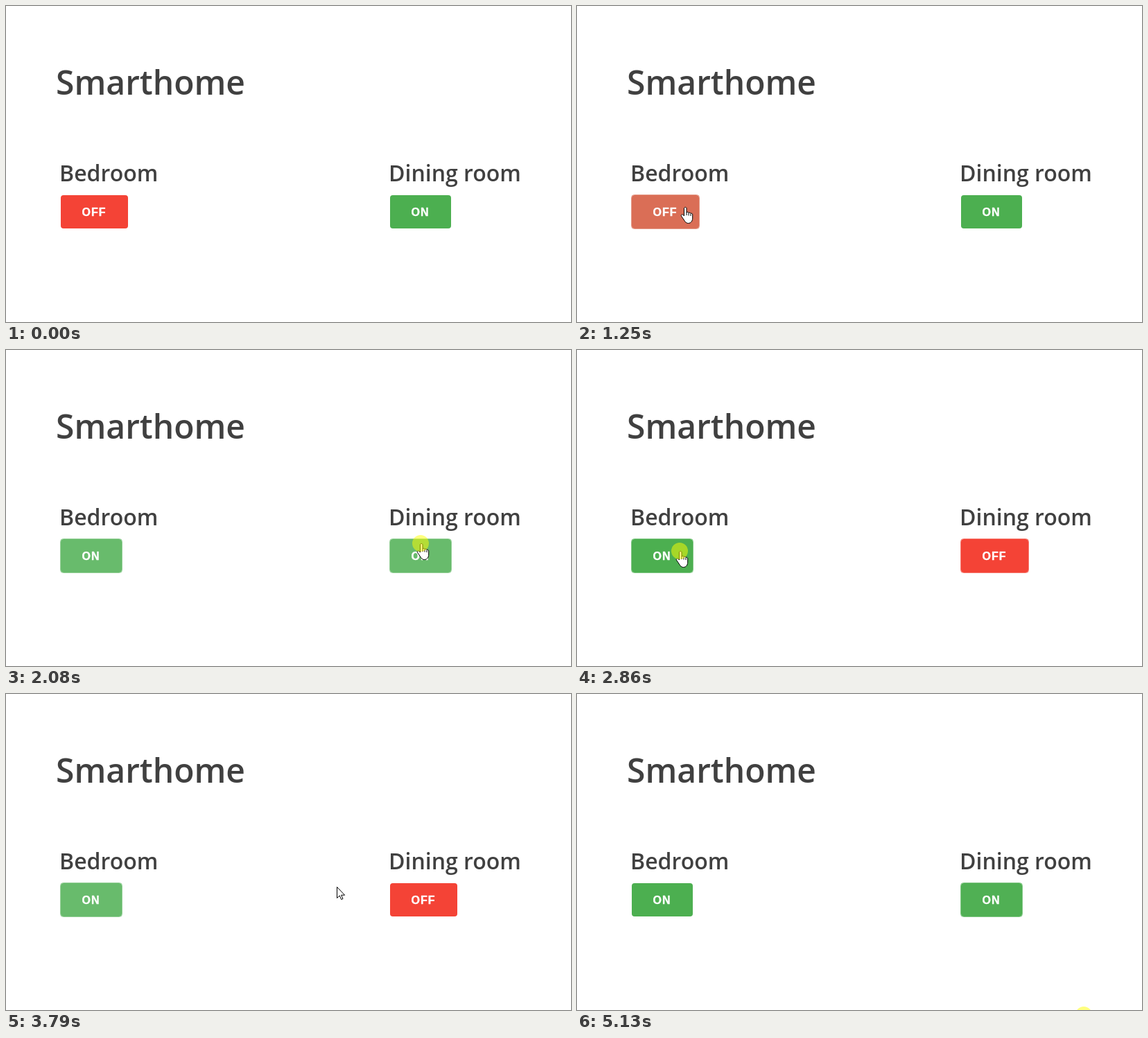
An HTML page that plays this animation: 815 by 456 pixels, repeating every 5.22 s.

```html
<!DOCTYPE html>
<html lang="en">
<head>
<meta charset="utf-8">
<title>Smarthome</title>
<style>
  html, body { margin: 0; width: 100%; height: 100%; overflow: hidden; background: #fff; }
  svg { display: block; }
  .title { font: 600 48px "Open Sans", sans-serif; fill: #404040; }
  .room { font: 600 32px "Open Sans", sans-serif; fill: #404040; }
  .label { font: 700 16px "Liberation Sans", Arial, sans-serif; letter-spacing: 1px; fill: #fff; stroke: #fff; stroke-width: .4; }
</style>
</head>
<body>
<svg width="815" height="456" viewBox="0 0 815 456">
  <text class="title" x="72" y="128">Smarthome</text>
  <text class="room" x="77" y="253">Bedroom</text>
  <text class="room" x="552" y="253">Dining room</text>
  <g id="bedroom"></g>
  <g id="dining"></g>
  <g id="cursor" fill="#fff" stroke="#000" stroke-linejoin="round">
    <path id="arrow" d="M.5 .5V16.5L4.2 13L6.7 18.5L9 17.5L6.6 12.2H11.6Z"/>
    <path id="hand" d="M-.5 2C-.5 0 3 0 3 2V8C4 7 6 7 6 8.7C7 7.7 9 8 9 9.6C10 8.8 11.7 9.2 11.7 11V16C11.7 20 9.5 23.5 5.5 23.5C2.5 23.5 1 21.5 -.5 19L-4.6 13C-5.3 11.2 -3 10 -1.7 11.6L-.5 13ZM3 8V12M6 9V12.5M9 10V13"/>
  </g>
  <circle id="halo" r="12" fill="#ff0" fill-opacity=".5"/>
</svg>
<script>
const LOOP = 5220, STEP = 77.3, STEPS = 67;
const RED = [244, 67, 54], GREEN = [76, 175, 80];
const TOP = 273, HEIGHT = 48;
const $ = id => document.getElementById(id);

// The visitor's script, in steps
const origin = { x: 619, y: 420 };
const moves = [
  { from: 1, to: 7, x: 155, y: 290 },
  { from: 18, to: 25, x: 598, y: 279 },
  { from: 29, to: 35, x: 148, y: 290 },
  { from: 46, to: 52, x: 587, y: 288 },
  { from: 57, to: 62, x: 731, y: 463 }
];
const presses = [
  { at: 14, hold: 1 }, { at: 27, hold: 2 }, { at: 35, hold: 3 },
  { at: 44, hold: 2 }, { at: 55, hold: 2 }, { at: 65, hold: 2 }
];

// Each move eases out along a slight upward arc
function pointer(k) {
  let { x, y } = origin;
  for (const m of moves) {
    if (k <= m.from) break;
    const u = Math.min(1, (k - m.from) / (m.to - m.from));
    const p = 1 - (1 - u) ** 2;
    x += (m.x - x) * p;
    y += (m.y - y) * p - 10.5 * Math.sin(Math.PI * u);
  }
  return { x, y };
}

const isPressed = k => presses.some(p => k >= p.at && k < p.at + p.hold);
const widthOf = lit => lit ? 88 : 97;

// Plays the script once: hover and focus dim a button, pressing restores it,
// releasing toggles it
function simulate() {
  const buttons = [
    { x: 79, fade: 0, on: false, since: 9 },
    { x: 554, fade: 0, on: true, since: 9 }
  ];
  const states = [];
  let focus = null, wasPressed = false;
  for (let k = 0; k < STEPS; k++) {
    const pos = pointer(k), pressed = isPressed(k);
    for (const b of buttons) {
      const change = Math.min(1, b.since / 2) ** 2.4;
      b.green = b.on ? change : 1 - change;
    }
    const over = buttons.find(b => pos.x >= b.x && pos.x < b.x + widthOf(b.green > .5)
      && pos.y >= TOP && pos.y < TOP + HEIGHT);
    states.push({ pos, pressed, over, buttons: buttons.map(b => ({ ...b })) });

    if (pressed && !wasPressed) focus = over;
    for (const b of buttons) {
      b.since++;
      if (wasPressed && !pressed && b === over) {
        b.on = !b.on;
        b.since = 1;
      }
      const dim = b === over ? !pressed : b === focus;
      b.fade += (dim - b.fade) * .85;
      if (b.fade < .01) b.fade = 0;
    }
    wasPressed = pressed;
  }
  return states;
}

const states = simulate();

const views = ['bedroom', 'dining'].map((id, i) => {
  const x = states[0].buttons[i].x, group = $(id);
  group.innerHTML = `<rect x="${x}" y="${TOP}" height="${HEIGHT}" rx="4"/>
    <rect x="${x - .5}" y="${TOP - .5}" height="${HEIGHT + 1}" rx="4" fill="none"/>
    <text class="label" x="${x + 30.5}" y="303"></text>`;
  const [face, edge, label] = group.children;
  return { group, face, edge, label };
});

function set(el, attrs) {
  for (const name in attrs) el.setAttribute(name, attrs[name]);
}

function show(el, visible) {
  el.style.display = visible ? '' : 'none';
}

function drawButton({ group, face, edge, label }, { fade, green }) {
  const color = `rgb(${RED.map((c, i) => Math.round(c + (GREEN[i] - c) * green))})`;
  const lit = green > .5, width = widthOf(lit);
  set(face, { width, fill: color });
  set(edge, { width: width + 1, stroke: color, 'stroke-opacity': fade > 0 ? .7 : 0 });
  set(group, { opacity: 1 - fade * .16 });
  label.textContent = lit ? 'ON' : 'OFF';
}

function draw(ms) {
  const k = Math.min(STEPS - 1, Math.floor((ms % LOOP + 9) / STEP));
  const { pos, pressed, over, buttons } = states[k];
  views.forEach((view, i) => drawButton(view, buttons[i]));
  const transform = `translate(${Math.round(pos.x)} ${Math.round(pos.y)})`;
  set($('cursor'), { transform });
  set($('halo'), { transform });
  show($('cursor'), k > 0);
  show($('hand'), over);
  show($('arrow'), !over);
  show($('halo'), pressed);
}

const start = performance.now();
function tick() {
  draw(performance.now() - start);
  requestAnimationFrame(tick);
}
tick();
</script>
</body>
</html>
```
